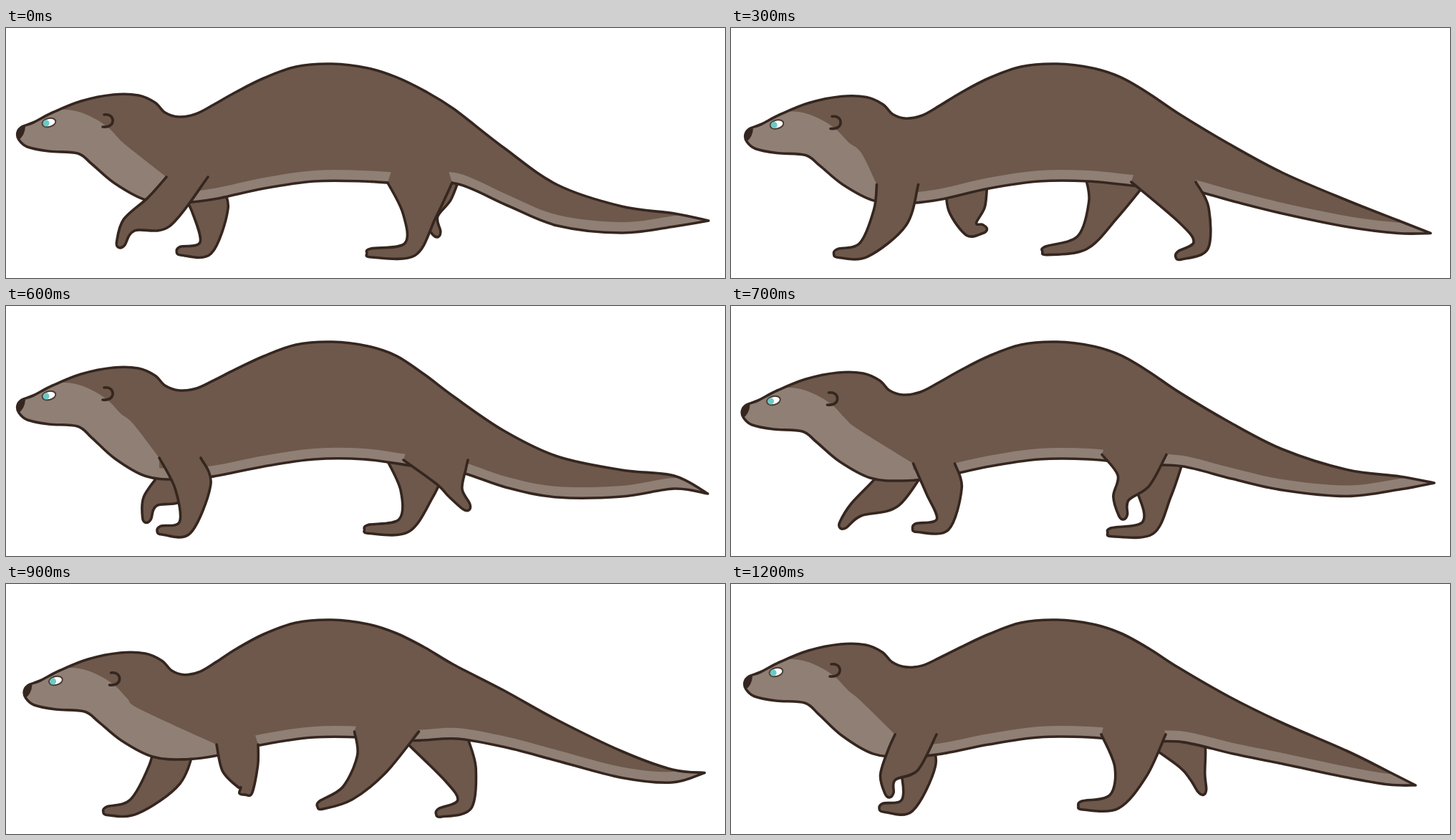
Recreate the animation shown at these times as an HTML page. Size 1004 px wide and 349 px high, loop 1300 ms.

```html
<!DOCTYPE html>
<html lang="en">
<head>
<meta charset="utf-8">
<title>Otter walk cycle</title>
<style>
html, body { margin: 0; width: 100%; height: 100%; overflow: hidden; background: #fff; }
svg { display: block; width: 100%; height: 100%; }
.fur { fill: #6d584b; }
.pale { fill: #8f7f75; }
.line { fill: none; stroke: #35261f; stroke-width: 3.6; stroke-linejoin: round; stroke-linecap: round; }
</style>
</head>
<body>
<svg viewBox="0 0 1004 349">
  <clipPath id="inside"><path class="body"/></clipPath>
  <g id="farFront"><path class="fur"/><path class="line"/></g>
  <g id="farHind"><path class="fur"/><path class="line"/></g>
  <g clip-path="url(#inside)">
    <path class="body pale"/>
    <path class="body fur" transform="translate(0 -15)"/>
    <path id="face" class="pale"/>
  </g>
  <g id="head">
    <path d="M22 138L16 146L18 156Q26 150 27 138Z" fill="#35261f"/>
    <path class="line" d="M137 121C152 118 155 140 135 138"/>
    <g transform="translate(60 132) rotate(-14)">
      <ellipse rx="9.5" ry="6" fill="#fff" stroke="#4b3a31" stroke-width="2"/>
      <ellipse cx="-4" rx="4.5" ry="4.6" fill="#6cc9c6"/>
    </g>
  </g>
  <path class="body line"/>
  <g id="nearFront"><path class="fur"/><path class="line"/></g>
  <g id="nearHind"><path class="fur"/><path class="line"/></g>
</svg>
<script>
const STEP = 100, STEPS = 13;
const points = text => text.split(' ').map(p => p.split(',').map(Number));

// Resting outline: tail tip, over the back to the nose, home underneath.
const OUTLINE = points('975,273 930,259 860,237 770,201 695,160 625,117 585,91 545,69 505,56 455,50 405,54 360,70 320,90 290,107 265,120 241,124 222,118 208,104 185,94 150,93 105,102 65,118 38,132 22,138 16,146 18,156 30,166 60,172 100,175 120,190 152,217 195,240 240,244 290,239 360,224 430,214 500,214 570,220 630,221 700,240 770,258 860,274 930,277');
const FACE = points('10,120 45,121 70,114 98,116 125,127 145,141 160,157 178,172');
const TAIL_X = [540, 620, 695, 770, 860, 930, 975];
// Half widths at hip, knee, ankle and toe.
const FRONT = [29, 25, 11, 6], HIND = [45, 23, 11, 6];

// One key pose every two steps: head shift, tail bend and reach, leg joints from hip to toe.
const key = (head, bend, reach, front, hind) =>
  ({ head: [head], tail: [[0, ...bend]], reach: [[reach]], front: points(front), hind: points(hind) });
const KEYS = [
  key([0, 0], [-5, 7, 18, 12, 0, -4], 6, '253,208 213,257 172,275 160,301', '578,216 577,262 564,309 510,314'),
  key([0, 14], [0, -7, 6, 18, 14, 0], 7, '228,222 209,267 160,312 122,319', '586,222 611,272 612,312 574,321'),
  key([8, -9], [5, 10, -4, -11, 5, 27], -3, '237,215 235,262 211,307 177,310', '622,208 682,250 700,295 679,314'),
  key([0, -7], [9, 14, 9, -8, -22, -11], 5, '243,212 261,252 250,309 217,313', '600,215 622,238 627,260 643,280'),
  key([-1, 7], [-3, -11, -11, -9, -20, -41], 9, '324,228 334,264 341,301 302,306', '526,200 502,250 462,277 452,304'),
  key([20, -1], [-5, -12, -11, 2, 20, 22], -8, '322,220 320,250 326,274 360,272', '537,212 518,254 492,307 429,313'),
  key([3, -9], [0, -3, -7, -4, 3, 8], -19, '258,210 240,246 219,270 221,292', '562,210 558,262 535,304 491,309')
];

const clamp = v => Math.max(0, Math.min(1, v));
const mix = (a, b, t) => a + (b - a) * t;

// Value of a pose part at any step; the last key is only one step before the loop.
function sample(name, step) {
  const s = step % STEPS, i = Math.floor(s / 2);
  const t = (s - 2 * i) / Math.min(2, STEPS - 2 * i);
  const a = KEYS[i][name], b = KEYS[(i + 1) % KEYS.length][name];
  return a.map((row, r) => row.map((v, k) => mix(v, b[r][k], t)));
}

function tailBend(x, bend) {
  const i = TAIL_X.findIndex(k => k >= x);
  if (i < 1) return 0;
  return mix(bend[i - 1], bend[i], (x - TAIL_X[i - 1]) / (TAIL_X[i] - TAIL_X[i - 1]));
}

// Smooth curve through all points, with free ends.
function curve(pts) {
  const at = i => pts[Math.max(0, Math.min(pts.length - 1, i))];
  let d = 'M' + pts[0];
  for (let i = 0; i < pts.length - 1; i++) {
    const [a, b, c, e] = [at(i - 1), at(i), at(i + 1), at(i + 2)];
    const out = [0, 1].map(k => b[k] + (c[k] - a[k]) / 6);
    const into = [0, 1].map(k => c[k] - (e[k] - b[k]) / 6);
    d += `C${out} ${into} ${c}`;
  }
  return d;
}

// Outline of a leg: joints widened to both sides, open at the hip.
function limb(joints, widths) {
  const dir = (a, b) => {
    const l = Math.hypot(b[0] - a[0], b[1] - a[1]);
    return [(b[0] - a[0]) / l, (b[1] - a[1]) / l];
  };
  const bones = joints.slice(1).map((j, i) => dir(joints[i], j));
  const front = [], back = [];
  joints.forEach(([x, y], i) => {
    const a = bones[Math.max(0, i - 1)], b = bones[Math.min(i, bones.length - 1)];
    const [dx, dy] = i ? dir([0, 0], [a[0] + b[0], a[1] + b[1]]) : [0, 1];
    const w = widths[i];
    front.push([x - dy * w, y + dx * w]);
    back.unshift([x + dy * w, y - dx * w]);
  });
  const toe = joints[3].map((v, k) => v + bones[2][k] * 6);
  return [...front, toe, ...back];
}

function drawLeg(id, joints, widths) {
  const edge = curve(limb(joints, widths)), [x, y] = joints[0], w = widths[0];
  const [fill, line] = document.getElementById(id).children;
  fill.setAttribute('d', `${edge}L${x + w - 8} ${y - 26}H${x - w + 8}Z`);
  line.setAttribute('d', edge);
}

function draw(step) {
  const [[hx, hy]] = sample('head', step), [bend] = sample('tail', step), [[reach]] = sample('reach', step);
  const pts = OUTLINE.map(([x, y]) => {
    const pull = clamp((340 - x) / 110), soft = 1 - clamp((y - 175) / 100);
    return [
      x + hx * pull + reach * clamp((x - 860) / 115),
      y + hy * pull * soft + tailBend(x, bend)
    ];
  });
  const shape = curve([...pts, pts[0]]) + 'Z';
  document.querySelectorAll('.body').forEach(p => p.setAttribute('d', shape));
  document.getElementById('head').setAttribute('transform', `translate(${hx} ${hy})`);

  const front = sample('front', step), hind = sample('hind', step);
  const shoulder = [front[0][0] - FRONT[0], front[0][1]];
  const face = curve([...FACE.map(([x, y]) => [x + hx, y + hy]), shoulder]);
  document.getElementById('face').setAttribute('d', face + 'V349H0Z');
  drawLeg('nearFront', front, FRONT);
  drawLeg('nearHind', hind, HIND);

  // The far legs walk the same cycle half a loop later.
  const far = name => sample(name, step + STEPS / 2).map(([x, y]) => [x + 6, y]);
  drawLeg('farFront', far('front'), FRONT);
  drawLeg('farHind', far('hind'), HIND);
}

let shown = -1;
function tick() {
  const step = Math.floor(performance.now() / STEP) % STEPS;
  if (step !== shown) draw(shown = step);
  requestAnimationFrame(tick);
}
tick();
</script>
</body>
</html>
```
